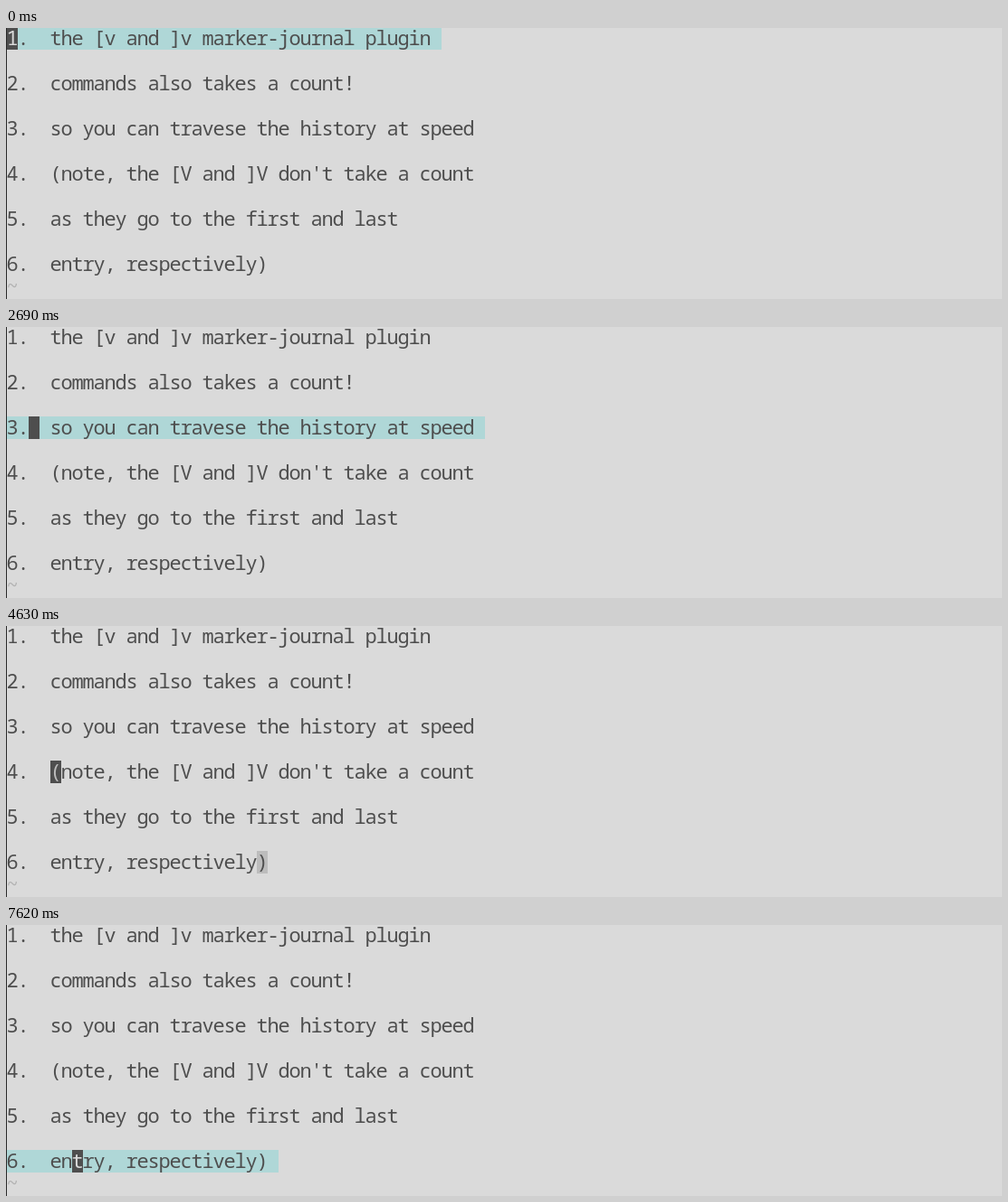
Write an HTML page with a canvas that moves like this. It is 1100 px wide and 300 px high and loops after 8000 ms.

```html
<!DOCTYPE html>
<html lang="en">
<head>
<meta charset="utf-8">
<title>Line selection by count</title>
<style>
  html, body { margin: 0; width: 100%; height: 100%; overflow: hidden; background: #dadada; }
  canvas { display: block; }
</style>
</head>
<body>
<canvas id="stage" width="1100" height="300"></canvas>
<script>
const ctx = document.getElementById('stage').getContext('2d');
const LOOP = 8000, CELL = 12, ROW = 25;
const PAPER = '#dadada', INK = '#4e4e4e', SELECTED = '#afd7d7', MATCH = '#bcbcbc', FILLER = '#b2b2b2';

const lines = [
  '1.  the [v and ]v marker-journal plugin',
  '2.  commands also takes a count!',
  '3.  so you can travese the history at speed',
  "4.  (note, the [V and ]V don't take a count",
  '5.  as they go to the first and last ',
  '6.  entry, respectively)'
];

// Per line: cursor arrives, line selected, cursor steps right, selection ends, cursor leaves
const visits = [
  [0, 0, 280, 530, 660],
  [1040, 1320, 1660, 1840, 1960],
  [2350, 2690, 3030, 3240, 3340],
  [3740, 4060, 4400, 4630, 4730],
  [5110, 5410, 5800, 6020, 6120],
  [6490, 6770, 7620, LOOP, LOOP]
];

function fillCells(row, col, count, color) {
  ctx.fillStyle = color;
  ctx.fillRect(1 + col * CELL, row * ROW - 1, count * CELL, ROW);
}

function write(text, row, col, color) {
  ctx.fillStyle = color;
  [...text].forEach((ch, i) => ctx.fillText(ch, 7 + (col + i) * CELL, row * ROW + 19));
}

function drawCursor(row, col, char, color) {
  fillCells(row, col, 1, INK);
  write(char, row, col, color);
}

function draw(t) {
  ctx.fillStyle = PAPER;
  ctx.fillRect(0, 0, 1100, 300);
  ctx.font = '22px "Noto Sans Mono", "DejaVu Sans Mono", monospace';
  ctx.textAlign = 'center';

  const k = visits.findLastIndex(v => t >= v[0]);
  const [, select, step, release, leave] = visits[k];
  const away = t >= leave;
  const row = 2 * k + (away ? 1 : 0);
  const col = away ? 0 : k + (t >= step ? 1 : 0);
  const char = away ? ' ' : lines[k][col];
  const paired = char === '(';

  if (t >= select && t < release) fillCells(2 * k, 0, lines[k].length + 1, SELECTED);
  if (paired) fillCells(10, lines[5].indexOf(')'), 1, MATCH);

  lines.forEach((line, i) => write(line, 2 * i, 0, INK));
  write('~', 11, 0, FILLER);
  drawCursor(row, col, char, paired ? MATCH : PAPER);

  ctx.fillStyle = '#2a2a2a';
  ctx.fillRect(0, 0, 1, 300);
}

function tick() {
  draw(performance.now() % LOOP);
  requestAnimationFrame(tick);
}
tick();
</script>
</body>
</html>
```
